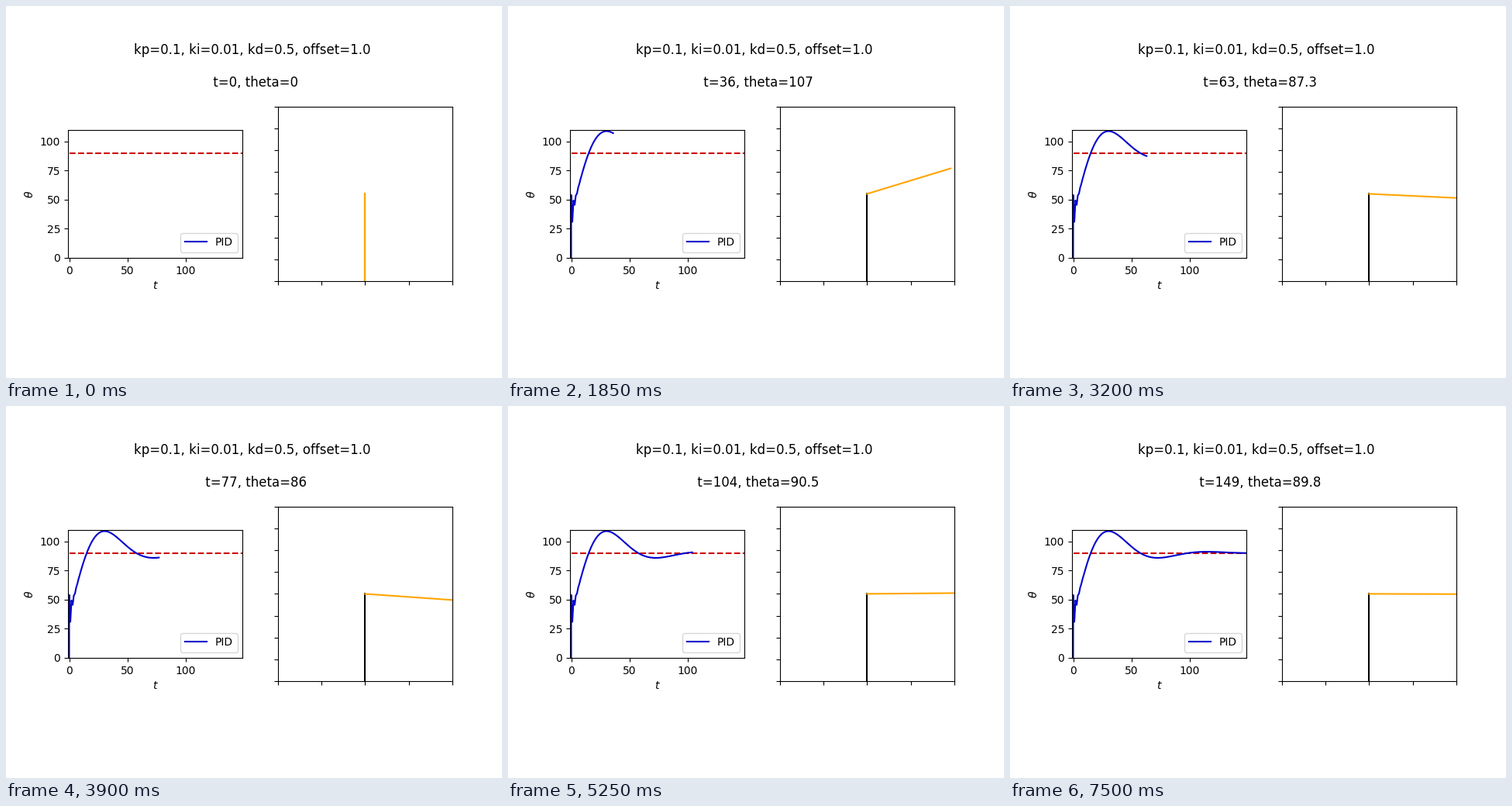
Write a matplotlib script that moves like this. It is 640 px wide and 480 px high and loops after 7.55 s.

```python
import numpy as np
import matplotlib.pyplot as plt
from matplotlib.animation import FuncAnimation

KP, KI, KD, OFFSET = 0.1, 0.01, 0.5, 1.0
GOAL = 90
STEPS = 150
BLUE, RED = "#0000cc", "#cc0000"


def simulate():
    """Angle of the arm under PID control, starting at rest."""
    theta, total, last = 0.0, 0.0, 0.0
    angles = [theta]
    for _ in range(STEPS):
        error = GOAL - theta
        total += error
        theta += KP * error + KI * total + KD * (error - last) - OFFSET
        last = error
        angles.append(theta)
    return np.array(angles)


thetas = simulate()
times = np.maximum(np.arange(STEPS + 1) - 1, 0)

fig, (graph, stage) = plt.subplots(1, 2, figsize=(6.4, 4.8), dpi=100)


def heading(text, y):
    return fig.text(0.5, 1 - y / 480, text, ha="center", fontsize=12)


heading(f"kp={KP}, ki={KI}, kd={KD}, offset={OFFSET} ", 62)
status = heading("", 104)

graph.set(xlim=(-1, STEPS - 1), ylim=(0, thetas.max() + 1), aspect="equal",
          xticks=[0, 50, 100], yticks=[0, 25, 50, 75, 100],
          xlabel="$t$", ylabel=r"$\theta$")
graph.hlines(GOAL, 0, STEPS - 1, colors=RED, linestyles="--")
curve, = graph.plot([], [], BLUE, label="PID")
graph.legend(loc="lower right")

stage.set(xlim=(-1, 1), ylim=(-1, 1), aspect="equal",
          xticks=np.linspace(-1, 1, 5), yticks=np.linspace(-1, 1, 9),
          xticklabels=[], yticklabels=[])
stage.plot([0, 0], [-1, 0], "k")
arm, = stage.plot([], [], "orange")


def update(i):
    theta = thetas[i]
    angle = np.radians(theta)
    curve.set_data(times[:i + 1], thetas[:i + 1])
    arm.set_data([0, np.sin(angle)], [0, -np.cos(angle)])
    status.set_text(f" t={times[i]}, theta={theta:.3g}")
    return curve, arm, status


anim = FuncAnimation(fig, update, frames=STEPS + 1, interval=50,
                     repeat=True, repeat_delay=0)
plt.show()
```
